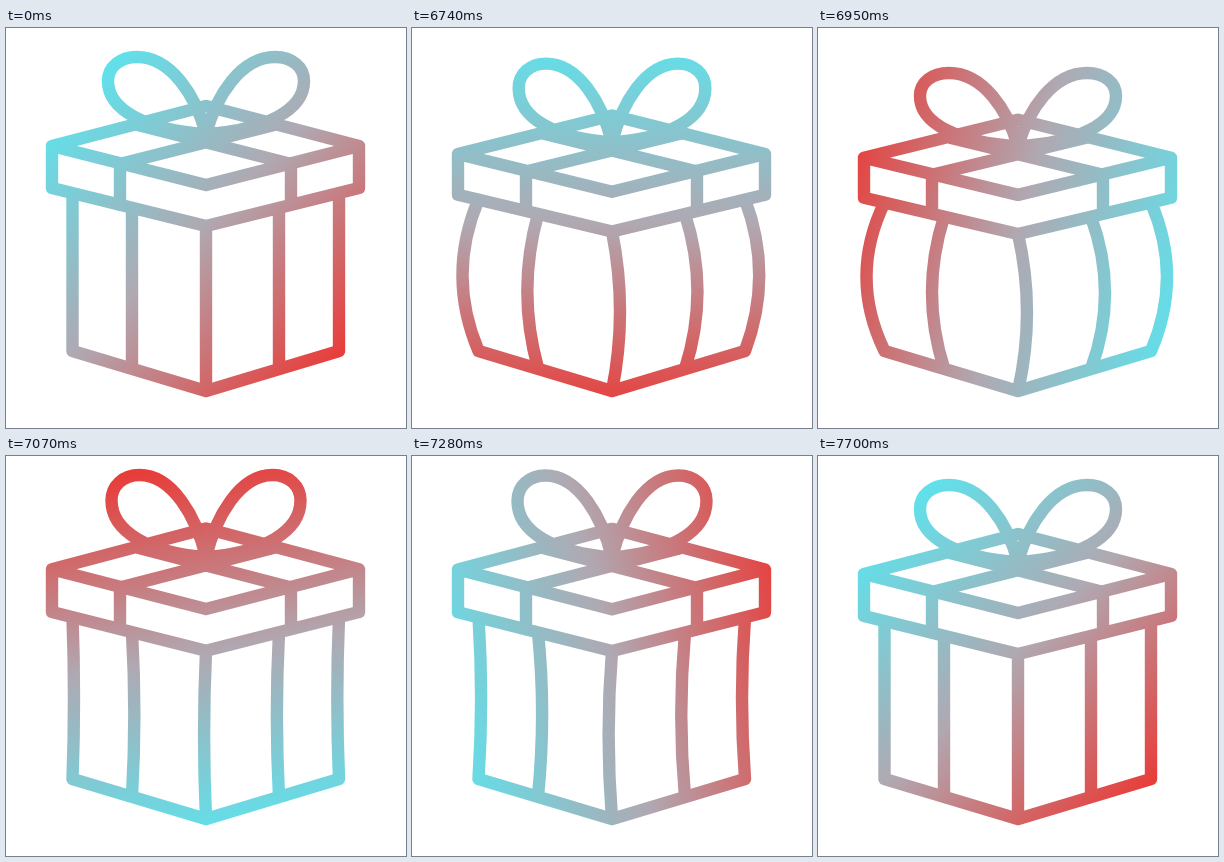
An HTML page for the animation above (7730 ms loop, 400 by 400 pixels).

```html
<!DOCTYPE html>
<html lang="en">
<head>
<meta charset="utf-8">
<title>Gift box</title>
<style>
  html, body { margin: 0; width: 100%; height: 100%; overflow: hidden; background: #fff; }
  svg { display: block; width: 100%; height: 100%; }
  path { fill: none; stroke: url(#tint); stroke-width: 12.4; stroke-linecap: round; stroke-linejoin: round; }
</style>
</head>
<body>
<svg viewBox="0 0 400 400">
  <defs>
    <linearGradient id="tint" gradientUnits="userSpaceOnUse" x1="14" y1="197" x2="386" y2="197">
      <stop offset="0" stop-color="#5ee2ec"/>
      <stop offset=".5" stop-color="#b0a8b1"/>
      <stop offset="1" stop-color="#e73e3b"/>
    </linearGradient>
  </defs>
  <path id="box"/>
</svg>
<script>
const LOOP = 7730, START = 6530, STEP = 30, FLOOR = 363;
const tint = document.getElementById('tint');
const box = document.getElementById('box');

const LID = 'M46 118 L200 78 L353 118 L200 157 Z L46 160 L200 198 L353 160 L353 118' +
  'M114 136 L114 177 M285 136 L285 177 M114 136 L268 97 M285 136 L132 97';
const LOOP_LEFT = 'M200 106 C190 68 165 29 131 29 C114 29 102 39 102 53 C102 82 140 102 200 106';

// Upright edges: x, lid y, bottom y, sideways shift when squashed and when stretched
const EDGES = [
  [66.5, 165, 323, -18, 7],
  [126, 180, 340, -12, 11],
  [200, 198, 363, 9, -9],
  [273, 180, 341, 14, -10],
  [333, 165, 323, 16, -8]
];

const HEIGHT = [[6500, 1], [6530, .996], [6740, .967], [6950, .952], [7160, 1.063], [7370, .989], [7580, 1], [7700, 1]];
const BEND = [[6500, 0], [6530, .13], [6740, .89], [6950, 1], [7160, -1], [7370, .03], [7580, 0], [7700, 0]];
const ANGLE = [[6500, 45], [6530, 46], [6740, 90], [6950, 195], [7160, 304], [7370, 368], [7700, 405]];

// Smooth curve through the keys that never overshoots them
function track(keys, t) {
  const last = keys.length - 1;
  if (t <= keys[0][0]) return keys[0][1];
  if (t >= keys[last][0]) return keys[last][1];
  const i = keys.findIndex(k => k[0] > t) - 1;
  const slope = n => (keys[n + 1][1] - keys[n][1]) / (keys[n + 1][0] - keys[n][0]);
  const tangent = n => {
    if (n === 0 || n === last) return 0;
    const a = slope(n - 1), b = slope(n);
    return a * b <= 0 ? 0 : 2 * a * b / (a + b);
  };
  const [t0, v0] = keys[i], [t1, v1] = keys[i + 1];
  const d = t1 - t0, u = (t - t0) / d, w = 1 - u;
  return v0 * (1 + 2 * u) * w * w + v1 * u * u * (3 - 2 * u) +
    d * u * w * (tangent(i) * w - tangent(i + 1) * u);
}

const mapPoints = (path, f) =>
  path.replace(/([\d.]+) ([\d.]+)/g, (_, x, y) => f(+x, +y).map(n => n.toFixed(2)).join(' '));

function draw(t) {
  const still = t < START;
  const time = still ? 0 : START + Math.floor((t - START) / STEP) * STEP;
  const height = track(HEIGHT, time);
  const bend = track(BEND, time);
  const flap = time > 6500 && time < 7400 ? Math.abs(Math.sin((time - 6500) / 450 * Math.PI)) : 0;
  const lift = y => FLOOR - (FLOOR - y) * height;

  const bow = side => mapPoints(LOOP_LEFT, (x, y) => [
    200 - side * (200 - x) * (1 - .048 * flap),
    lift(106 + (y - 106) * (1 + .06 * flap))
  ]);
  const edges = EDGES.map(([x, top, bottom, out, inward]) => {
    const y = lift(top);
    const shift = 2 * (bend > 0 ? bend * out : -bend * inward);
    return `M${x} ${y} Q${x + shift} ${(y + bottom) / 2} ${x} ${bottom}`;
  });

  box.setAttribute('d', mapPoints(LID, (x, y) => [x, lift(y)]) + bow(1) + bow(-1) +
    edges.join('') + 'M66.5 323 L200 363 L333 323');
  tint.setAttribute('gradientTransform', `rotate(${track(ANGLE, time)} 200 197)`);
}

const begin = performance.now();
function tick() {
  draw((performance.now() - begin) % LOOP);
  requestAnimationFrame(tick);
}
tick();
</script>
</body>
</html>
```
